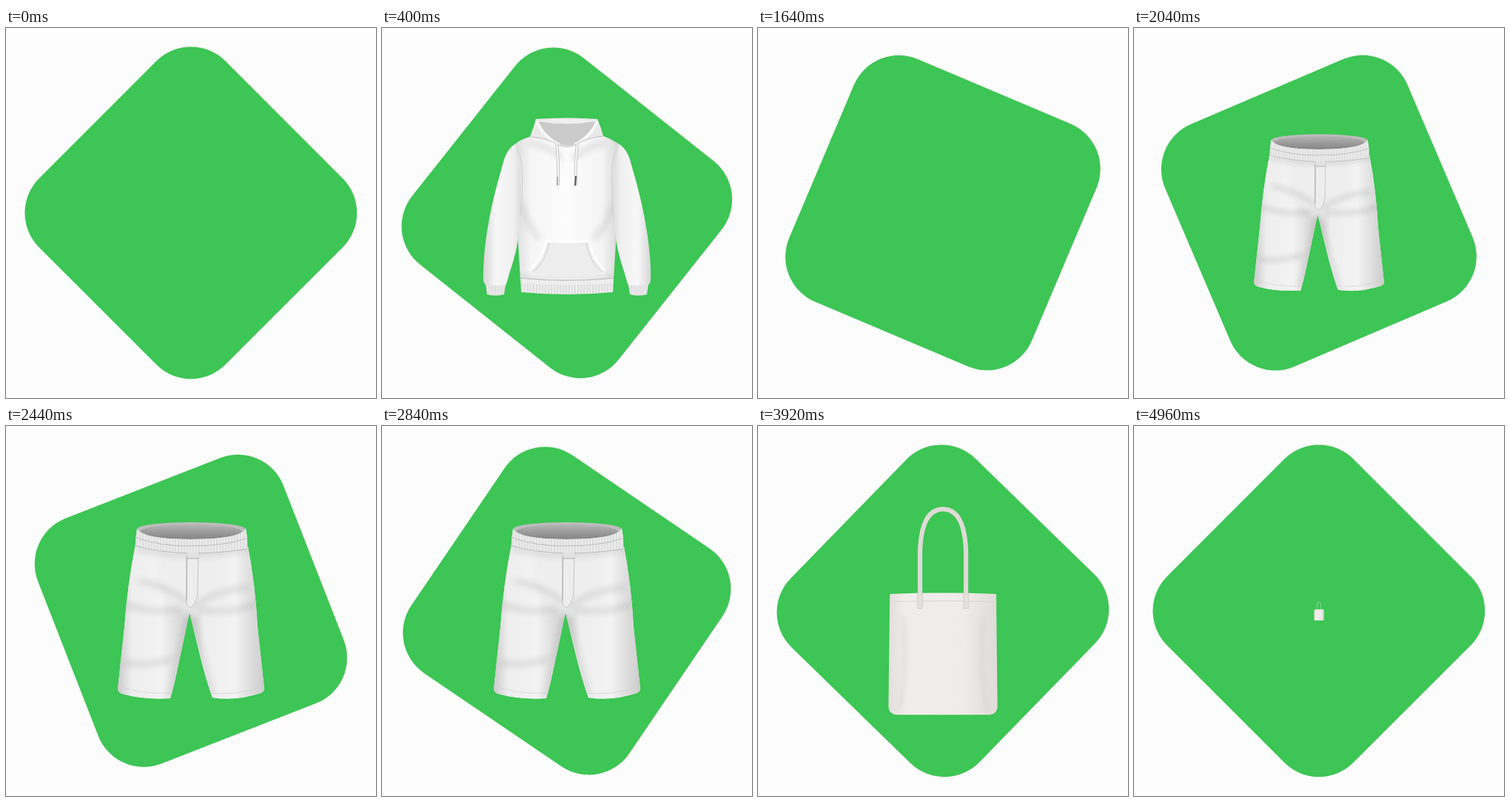
Write an HTML page that moves like this. It is 500 px wide and 500 px high and loops after 5000 ms.

```html
<!DOCTYPE html>
<html lang="en">
<head>
<meta charset="utf-8">
<title>Product carousel</title>
<style>
html, body { margin: 0; width: 100%; height: 100%; overflow: hidden; background: #fcfcfc; }
svg { display: block; width: 100vw; height: 100vh; }
</style>
</head>
<body>
<svg viewBox="0 0 500 500">
  <defs>
    <filter id="soft" x="-50%" y="-50%" width="200%" height="200%"><feGaussianBlur stdDeviation="4"/></filter>
    <linearGradient id="sleeveL"><stop offset="0" stop-color="#d6d6d6"/><stop offset=".3" stop-color="#f7f7f7"/><stop offset=".7" stop-color="#f0f0f0"/><stop offset="1" stop-color="#cfcfcf"/></linearGradient>
    <linearGradient id="sleeveR"><stop offset="0" stop-color="#cfcfcf"/><stop offset=".3" stop-color="#f0f0f0"/><stop offset=".7" stop-color="#f7f7f7"/><stop offset="1" stop-color="#d6d6d6"/></linearGradient>
    <linearGradient id="torso"><stop offset="0" stop-color="#dedede"/><stop offset=".16" stop-color="#f6f6f6"/><stop offset=".5" stop-color="#fcfcfc"/><stop offset=".84" stop-color="#f4f4f4"/><stop offset="1" stop-color="#d8d8d8"/></linearGradient>
    <linearGradient id="leg"><stop offset="0" stop-color="#c9c9c9"/><stop offset=".2" stop-color="#eeeeee"/><stop offset=".6" stop-color="#f3f3f3"/><stop offset="1" stop-color="#cbcbcb"/></linearGradient>
    <linearGradient id="inside" x2="0" y2="1"><stop offset="0" stop-color="#b4b4b4"/><stop offset="1" stop-color="#858585"/></linearGradient>
    <linearGradient id="cloth"><stop offset="0" stop-color="#e2dedb"/><stop offset=".15" stop-color="#f0edea"/><stop offset=".7" stop-color="#eeebe8"/><stop offset="1" stop-color="#dfdbd8"/></linearGradient>
    <pattern id="rib" width="4" height="30" patternUnits="userSpaceOnUse"><path d="M1 0V30" stroke="#bdbdbd" stroke-width="1"/></pattern>
    <clipPath id="torsoClip"><path id="torsoPath" d="M200 147Q186 151 180 157Q187 185 188 215L184 290L187 340H313L316 290L311 215Q313 185 320 157Q312 151 299 146Z"/></clipPath>
    <clipPath id="legsClip"><path id="legsPath" d="M175 160Q164 215 160 272L151 355Q151 360 157 362Q185 370 222 368Q227 352 233 322L248 252L262 310Q270 343 279 367Q310 372 344 361Q349 359 349 355L340 272Q337 215 327 163L250 172Z"/></clipPath>
  </defs>

  <g id="tile">
    <rect id="rim" x="-178" y="-178" width="356" height="356" rx="66" fill="#ecefe2"/>
  </g>
  <rect id="face" x="-178" y="-178" width="356" height="356" rx="66" fill="#3dc555"/>

  <g id="hoodie">
    <path d="M181 156Q168 163 163 185Q148 235 142 275Q136 315 137 342Q139 347 141 348L166 350Q169 344 172 332Q183 300 186 272L195 212Q191 180 181 156Z" fill="url(#sleeveL)"/>
    <path d="M319 156Q332 163 337 185Q352 235 358 275Q364 315 363 342Q361 347 359 348L334 350Q331 344 328 332Q317 300 314 272L305 212Q309 180 319 156Z" fill="url(#sleeveR)"/>
    <path d="M140 345Q153 350 167 347L165 360Q153 363 142 360ZM360 345Q347 350 333 347L335 360Q347 363 358 360Z" fill="#e9e9e9"/>
    <path d="M140 345Q153 350 167 347L165 360Q153 363 142 360ZM360 345Q347 350 333 347L335 360Q347 363 358 360Z" fill="url(#rib)" opacity=".45"/>
    <use href="#torsoPath" fill="url(#torso)"/>
    <g clip-path="url(#torsoClip)">
      <g fill="none" stroke="#9a9a9a" stroke-width="5" opacity=".35" filter="url(#soft)">
        <path d="M198 155Q235 163 243 178M302 155Q270 163 258 178M186 235Q195 265 212 285M314 235Q305 265 287 285M187 338H313M250 300V330"/>
      </g>
      <path d="M184 165Q194 190 187 255M316 165Q306 190 313 255" fill="none" stroke="#cfcfcf"/>
    </g>
    <path d="M187 337Q250 343 313 337L312 357Q250 363 188 357Z" fill="#eeeeee"/>
    <path d="M188 345Q250 349 312 345L312 357Q250 363 188 357Z" fill="url(#rib)" opacity=".7"/>
    <path d="M187 338Q250 344 313 338" fill="none" stroke="#c4c4c4" stroke-width="1.5"/>
    <path d="M222 288Q250 290 280 288Q283 307 301 325L298 331Q250 336 203 331L200 325Q217 311 222 288Z" fill="#ededed"/>
    <path d="M222 288Q250 290 280 288M222 288Q217 312 200 327M280 288Q284 312 301 327" fill="none" stroke="#fff" stroke-width="3"/>
    <path d="M226 291Q221 315 205 329M276 291Q280 315 296 329" fill="none" stroke="#cbcbcb"/>
    <path d="M208 123Q250 120 291 123Q296 134 299 146Q274 149 259 159Q250 162 240 159Q225 149 200 147Q205 134 208 123Z" fill="#e9e9e9"/>
    <path d="M211 127Q250 121 289 127Q285 143 261 157Q250 160 239 157Q216 144 211 127Z" fill="#cbcbcb"/>
    <path d="M211 126Q250 120 289 126Q250 133 211 126Z" fill="#efefef"/>
    <path d="M209 126Q218 147 240 158M291 126Q283 146 260 158" fill="none" stroke="#f8f8f8" stroke-width="4"/>
    <path d="M200 147Q225 149 240 159Q250 162 259 159Q274 149 299 146" fill="none" stroke="#bebebe"/>
    <path d="M236 156Q239 180 238 213M264 156Q261 180 262 213" fill="none" stroke="#c4c4c4" stroke-width="4"/>
    <path d="M236 156Q239 180 238 213M264 156Q261 180 262 213" fill="none" stroke="#fafafa" stroke-width="2"/>
    <path d="M237 201V213" stroke="#aaa" stroke-width="2"/>
    <path d="M262 200L261 213" stroke="#555" stroke-width="2"/>
  </g>

  <g id="shorts">
    <path d="M177 139Q182 131 250 130Q318 131 324 139L324 153Q250 166 177 153Z" fill="#bcbcbc"/>
    <ellipse cx="250" cy="143" rx="69" ry="10" fill="url(#inside)"/>
    <use href="#legsPath" fill="#eee"/>
    <g clip-path="url(#legsClip)">
      <path d="M150 155H250V250L222 372H150Z" fill="url(#leg)"/>
      <path d="M250 155H350V372H279L248 250Z" fill="url(#leg)"/>
      <path d="M205 155H295V225L250 262L205 225Z" fill="#eeeeee" filter="url(#soft)"/>
      <g fill="none" stroke="#888" stroke-width="5" opacity=".3" filter="url(#soft)">
        <path d="M248 240Q215 215 180 210M250 245Q285 222 328 218M248 250L222 365M248 250L279 365M160 240Q195 255 240 247M340 240Q305 255 258 248M174 165Q250 182 328 165M158 320Q190 325 225 315"/>
      </g>
      <path d="M151 351Q185 363 225 361M276 361Q315 364 350 351" fill="none" stroke="#cdcdcd" stroke-dasharray="2 1"/>
    </g>
    <path d="M245 171H260L259 225Q258 240 249 246L244 240Z" fill="#ededed" stroke="#c6c6c6"/>
    <path d="M244 176V236" stroke="#aaa"/>
    <path id="band" d="M177 139Q186 153 250 153Q315 153 324 139Q327 152 326 166Q290 172 250 172Q208 171 175 162Q175 150 177 139Z" fill="#ededed"/>
    <use href="#band" style="fill:url(#rib)" opacity=".6"/>
    <path d="M177 139Q186 153 250 153Q315 153 324 139L326 166Q290 172 250 172Q208 171 175 162Z" fill="url(#rib)" opacity=".6"/>
    <path d="M176 151Q210 163 250 162Q295 162 325 152M175 162Q208 171 250 172Q290 172 326 166" fill="none" stroke="#bdbdbd"/>
    <path d="M245 171H260V179H245Z" fill="#e2e2e2"/>
    <path d="M245 179H260" stroke="#aaa"/>
  </g>

  <g id="bag">
    <path d="M215 232V160Q217 95 250 95Q283 95 285 160V232" fill="none" stroke="#dedad6" stroke-width="7"/>
    <path d="M169 224Q250 221 331 224L333 396Q332 408 320 408H180Q168 408 167 396Z" fill="url(#cloth)"/>
    <path d="M168 236Q250 233 332 236" fill="none" stroke="#d6d2ce"/>
    <path d="M211 224H219V246H211ZM281 224H289V246H281Z" fill="#e4e0dc" stroke="#d3cfcb"/>
    <path d="M190 260Q196 330 184 400M312 260Q304 330 317 400" fill="none" stroke="#cfcac6" stroke-width="5" opacity=".5" filter="url(#soft)"/>
  </g>
</svg>
<script>
const LOOP = 5000, STEP = 40;
const $ = id => document.getElementById(id);

// start, duration, degrees added
const turns = [
  [0, 930, -24.2],
  [1400, 880, 48.2],
  [2280, 900, -41.6],
  [3280, 880, 17.6]
];
// growing starts, shrinking starts
const items = [
  ['hoodie', 0, 1200],
  ['shorts', 1860, 3080],
  ['bag', 3740, 4800]
];
const GROW = 236, SHRINK = 200;

const clamp = x => Math.max(0, Math.min(1, x));
const inOut = (x, n) => x < .5 ? Math.pow(2 * x, n) / 2 : 1 - Math.pow(2 - 2 * x, n) / 2;
const ease = (t, start, span, n) => inOut(clamp((t - start) / span), n);

function draw(t) {
  const angle = turns.reduce((sum, [start, span, deg]) => sum + deg * ease(t, start, span, 4), 45);
  $('face').setAttribute('transform', `translate(249.8 249.8) rotate(${angle})`);
  $('rim').setAttribute('transform', `translate(250.6 249) rotate(${angle})`);
  for (const [id, show, hide] of items) {
    const size = ease(t, show, GROW, 2) - ease(t, hide, SHRINK, 2);
    const el = $(id);
    el.style.display = size > .001 ? '' : 'none';
    el.setAttribute('transform', `translate(250 250) scale(${size}) translate(-250 -250)`);
  }
}

const began = performance.now();
function tick() {
  const t = (performance.now() - began) % LOOP;
  draw(Math.floor(t / STEP) * STEP);
  requestAnimationFrame(tick);
}
tick();
</script>
</body>
</html>
```
